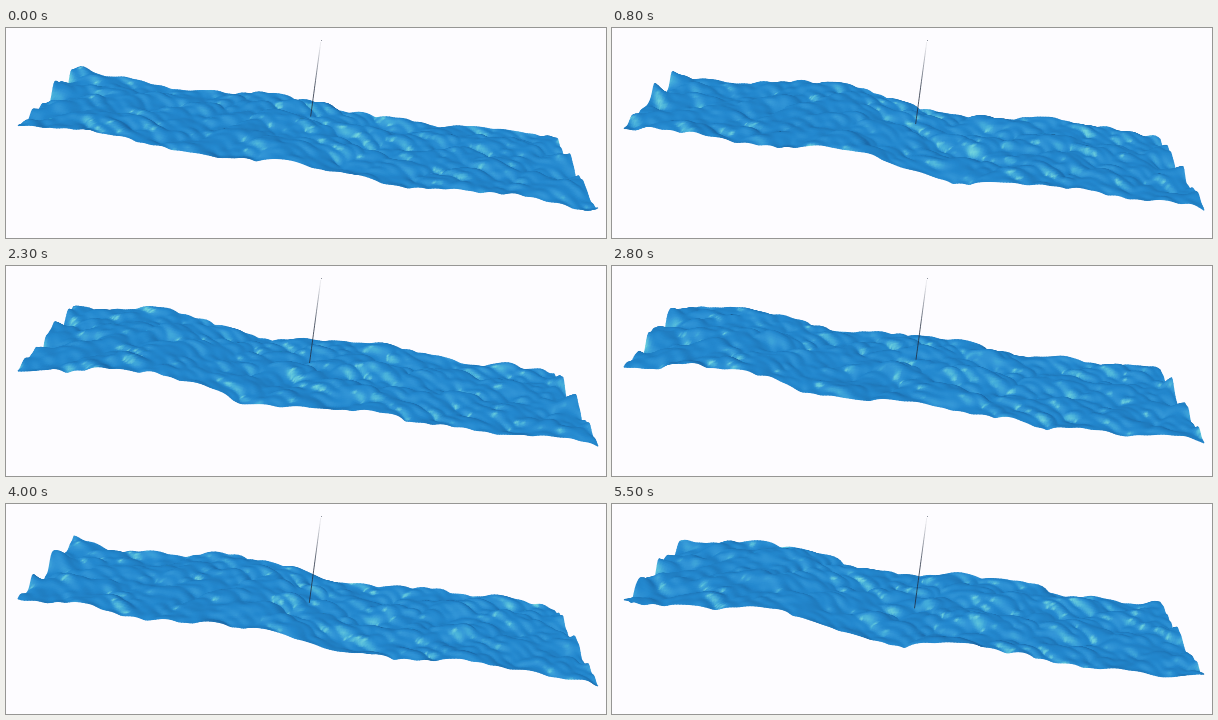
A matplotlib script for the animation above (5600 ms loop, 600 by 210 pixels).

```python
import numpy as np
import matplotlib.pyplot as plt
from matplotlib.animation import FuncAnimation
from matplotlib.collections import LineCollection
from matplotlib.colors import LinearSegmentedColormap
from matplotlib.tri import Triangulation

W, H, DPI = 600, 210, 100
FRAMES, STEP = 56, 100
BG = "#fdfcff"
COLS, ROWS = 200, 60
LEN_X, LEN_Y = 13.0, 4.2  # sheet size in wave units
WAVES = 56

WATER = LinearSegmentedColormap.from_list("water", [
    (0.0, "#1b67a6"), (0.25, "#1f7abd"), (0.5, "#2388cf"),
    (0.7, "#3497d8"), (0.85, "#45aedb"), (1.0, "#74d6de")])

# Mean far and near rim of the sheet on screen
FAR = [(68, 44), (130, 48), (190, 53), (310, 76), (430, 91), (548, 107)]
NEAR = [(12, 100), (85, 103), (157, 113), (302, 141), (375, 151), (592, 178)]


def rim(points, s):
    xs, ys = np.array(points, float).T
    x = xs[0] + (xs[-1] - xs[0]) * s
    return x, np.interp(x, xs, ys)


# Sheet in perspective: u runs along it, v from back to front
u, v = np.meshgrid(np.linspace(0, 1, COLS), np.linspace(0, 1, ROWS))
depth = v / (v + 1.23 * (1 - v))
far_x, far_y = rim(FAR, u)
near_x, near_y = rim(NEAR, u)
base_x = far_x + (near_x - far_x) * depth
base_y = far_y + (near_y - far_y) * depth

# Random chop with deep-water speeds
rng = np.random.default_rng(11)
length = np.exp(rng.uniform(np.log(0.3), np.log(1.7), WAVES))
angle = np.pi / 2 + rng.uniform(-1.15, 1.15, WAVES)
k = 2 * np.pi / length
kx, ky = k * np.cos(angle), k * np.sin(angle)
omega = 1.6 * np.sqrt(k)
phase = rng.uniform(0, 2 * np.pi, WAVES)
amp = length ** 1.1
amp /= np.sqrt((amp ** 2).sum() / 2)
carrier = np.exp(1j * (kx[:, None, None] * u * LEN_X
                       + ky[:, None, None] * v * LEN_Y
                       + phase[:, None, None]))

# The chop is low along the rims and high at the two ends
ends = np.exp(-u / 0.03) + np.exp((u - 1) / 0.03)
height = (1.5 + 0.8 * np.sin(np.pi * v)) * (1 + 0.8 * ends)

# Two triangles per cell, listed from back to front
idx = np.arange(ROWS * COLS).reshape(ROWS, COLS)
a, b, c, d = (q.ravel() for q in
              (idx[:-1, :-1], idx[:-1, 1:], idx[1:, :-1], idx[1:, 1:]))
cells = np.stack([a, b, c, b, d, c], axis=1).reshape(-1, 3)


def swell(x, t):
    """Long wave rolling left; 1 is a trough, -1 a crest."""
    return np.cos(2 * np.pi * (x - 400 + 65 * t) / 225)


def surface(t):
    spin = amp * np.exp(-1j * omega * t)

    def total(weight):
        return np.tensordot(spin * weight, carrier, 1)

    h = total(np.ones(WAVES)).real
    push = total(kx / k).imag
    sx, sy = -total(kx).imag, -total(ky).imag

    x = base_x + 3 * push * np.sin(np.pi * u) ** 0.5
    roll = 2 + 4.5 * np.exp(-((base_x - 230) / 150) ** 2)
    drift = (4 - 1.9 * t) * (1 - depth) + (1 - 0.7 * t) * depth
    y = base_y + drift + roll * swell(base_x, t) - h * height

    sx, sy = sx / sx.std(), sy / sy.std()
    glint = np.exp(-((sx - 1.2) ** 2 + (sy + 1.4) ** 2) / 0.2)
    shade = 0.43 + 0.08 * sx - 0.15 * sy + 0.3 * glint
    return x, y, np.clip(shade, 0, 1)


fig = plt.figure(figsize=(W / DPI, H / DPI), dpi=DPI, facecolor=BG)
ax = fig.add_axes([0, 0, 1, 1])


def draw_pole(t):
    end = 93 + 1.6 * t + 5 * swell(305, t)
    y = np.linspace(14, end, 30)
    pts = np.stack([315 - 0.135 * (y - 12), y], axis=1)
    alpha = np.clip((y[:-1] - 12) / 55, 0.08, 0.85)
    ax.add_collection(LineCollection(
        np.stack([pts[:-1], pts[1:]], axis=1),
        colors=[(0.13, 0.17, 0.24, q) for q in alpha],
        linewidths=0.65, zorder=3))
    ax.plot(315, 12, ".", ms=1.2, mew=0, color="#777c88", zorder=3)


def draw(frame):
    t = frame * STEP / 1000
    ax.clear()
    ax.axis("off")
    x, y, shade = surface(t)
    ax.tripcolor(Triangulation(x.ravel(), y.ravel(), cells), shade.ravel(),
                 shading="gouraud", cmap=WATER, vmin=0, vmax=1)
    draw_pole(t)
    ax.set_xlim(0, W)
    ax.set_ylim(H, 0)
    return []


anim = FuncAnimation(fig, draw, frames=FRAMES, interval=STEP,
                     init_func=lambda: [], repeat=True, repeat_delay=0,
                     blit=False)
plt.show()
```
